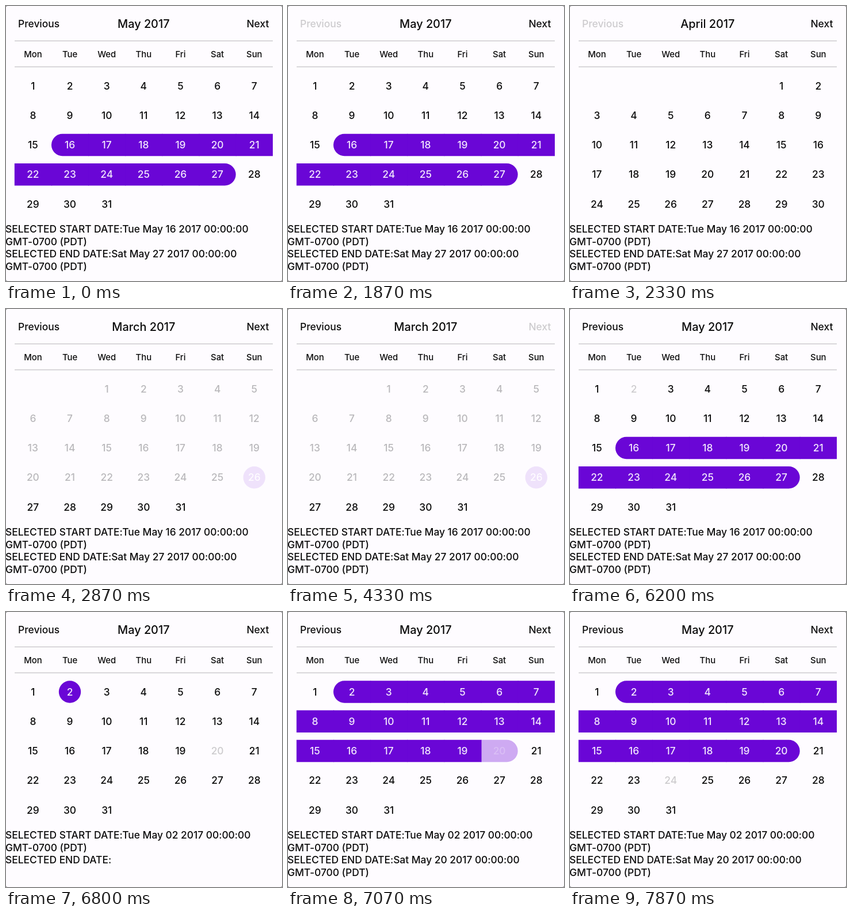
An HTML page that plays this animation: 480 px wide and 477 px high, repeating every 8 s.

```html
<!DOCTYPE html>
<html lang="en">
<head>
<meta charset="utf-8">
<title>Calendar range picker</title>
<style>
  html, body { margin: 0; width: 100%; height: 100%; overflow: hidden; background: #8b8a8d; }
  svg { display: block; width: 480px; height: 477px; }
  text { font-family: Inter, Roboto, sans-serif; font-size: 17.4px; font-weight: 450; letter-spacing: -0.02px; fill: #0c0c0c; white-space: pre; }
  .mid { text-anchor: middle; }
  .title { font-size: 19.9px; }
  .week { font-size: 14.9px; }
  line { stroke: #cbcacd; stroke-width: 1.5; }
</style>
</head>
<body>
<svg id="stage" viewBox="0 0 480 477"></svg>
<script>
const LOOP = 8000, LEFT = 14.8, RIGHT = 464, TOP = 119.3, COL = 64.15, ROW = 51.25, SIZE = 38.4;
const PURPLE = '#6a06d6', PALE = '#efe2fb';
const stage = document.getElementById('stage');

function add(tag, attrs, content = '') {
  const el = document.createElementNS('http://www.w3.org/2000/svg', tag);
  for (const key in attrs) el.setAttribute(key, attrs[key]);
  el.textContent = content;
  return stage.appendChild(el);
}
function set(el, key, value) {
  if (el.getAttribute(key) !== String(value)) el.setAttribute(key, value);
}
function label(el, value) {
  if (el.textContent !== value) el.textContent = value;
}

// Month name, first weekday (Monday = 0), number of days, first enabled day
const MARCH = { name: 'March 2017', first: 2, days: 31, min: 27 };
const APRIL = { name: 'April 2017', first: 5, days: 30, min: 1 };
const MAY = { name: 'May 2017', first: 0, days: 31, min: 1 };

const months = [[0, MAY], [2000, APRIL], [2530, MARCH], [4530, APRIL], [5130, MAY]];
const ranges = [[0, [16, 27]], [6400, [2, 0]], [7000, [2, 20]]];

// Press and release times
const presses = {
  prev: [[1865, 2000], [2325, 2530]],
  next: [[4325, 4530], [4865, 5130]],
  2: [[6195, 6400]],
  20: [[6795, 7000]],
  24: [[7795, LOOP]]
};

const latest = (list, t) => list.filter(([start]) => start <= t).pop()[1];

function opacity(key, t) {
  const press = (presses[key] || []).filter(([down]) => down <= t).pop();
  if (!press) return 1;
  const p = Math.min(1, Math.max(0, (t - press[1]) / 250));
  const ease = p < 0.5 ? 2 * p * p : 1 - 2 * (1 - p) * (1 - p);
  return +(0.2 + 0.8 * ease).toFixed(3);
}

add('rect', { width: 480, height: 477, rx: 3, fill: '#fefcff' });
const prev = add('text', { x: 21, y: 37.2 }, 'Previous');
const title = add('text', { x: 239.3, y: 38, class: 'mid title' });
const next = add('text', { x: 457.3, y: 37.2, 'text-anchor': 'end' }, 'Next');
for (const y of [60.4, 105.6]) add('line', { x1: 15, x2: RIGHT, y1: y, y2: y });
['Mon', 'Tue', 'Wed', 'Thu', 'Fri', 'Sat', 'Sun'].forEach((day, i) =>
  add('text', { x: LEFT + COL * (i + 0.5), y: 88.7, class: 'mid week' }, day));

const cells = Array.from({ length: 35 }, (_, i) => ({
  x: LEFT + COL * (i % 7),
  y: TOP + ROW * Math.floor(i / 7),
  back: add('path', { d: '' })
}));
for (const cell of cells)
  cell.text = add('text', { x: cell.x + COL / 2, y: cell.y + 25.3, class: 'mid' });

const lines = [0, 1, 2, 3].map(i => add('text', { x: -1, y: 393.2 + 21.5 * i }));

function shape({ x, y }, kind) {
  const r = SIZE / 2, end = x + COL;
  const join = Math.min(end + 1, RIGHT); // overlap the next cell to hide the seam
  if (kind === 'dot')
    return `M${x + COL / 2} ${y}a${r} ${r} 0 0 1 0 ${SIZE}a${r} ${r} 0 0 1 0 ${-SIZE}z`;
  if (kind === 'start')
    return `M${join} ${y}H${x + r}a${r} ${r} 0 0 0 0 ${SIZE}H${join}z`;
  if (kind === 'end')
    return `M${x} ${y}H${end - r}a${r} ${r} 0 0 1 0 ${SIZE}H${x}z`;
  if (kind === 'mid')
    return `M${x} ${y}H${join}v${SIZE}H${x}z`;
  return '';
}

function kindOf(day, month, [from, to]) {
  if (month === MARCH && day === 26) return 'dot';
  if (month !== MAY) return '';
  if (day === from) return to ? 'start' : 'dot';
  if (day === to) return 'end';
  return day > from && day < to ? 'mid' : '';
}

// 1 May 2017 was a Monday
function stamp(day) {
  const name = ['Sun', 'Mon', 'Tue', 'Wed', 'Thu', 'Fri', 'Sat'][day % 7];
  return `${name} May ${String(day).padStart(2, '0')} 2017 00:00:00`;
}

function draw(t) {
  const month = latest(months, t), range = latest(ranges, t), [from, to] = range;
  label(title, month.name);
  set(prev, 'opacity', opacity('prev', t));
  set(next, 'opacity', opacity('next', t));

  cells.forEach((cell, i) => {
    const n = i - month.first + 1;
    const day = n > 0 && n <= month.days ? n : 0;
    const kind = day ? kindOf(day, month, range) : '';
    const off = day < month.min;
    const alpha = month === MAY ? opacity(day, t) : 1;
    label(cell.text, day ? String(day) : '');
    cell.text.style.fill = kind ? (off ? '#fefcff' : '#f3e8fd') : off ? '#b9b8bb' : '';
    set(cell.back, 'd', shape(cell, kind));
    set(cell.back, 'fill', off ? PALE : PURPLE);
    set(cell.back, 'opacity', alpha);
    set(cell.text, 'opacity', alpha);
  });

  const zone = 'GMT-0700 (PDT)';
  label(lines[0], 'SELECTED START DATE:' + stamp(from));
  label(lines[1], zone);
  label(lines[2], 'SELECTED END DATE:' + (to ? stamp(to) : ''));
  label(lines[3], to ? zone : '');
}

const begin = performance.now();
function tick() {
  draw((performance.now() - begin) % LOOP);
  requestAnimationFrame(tick);
}
draw(0);
requestAnimationFrame(tick);
</script>
</body>
</html>
```
